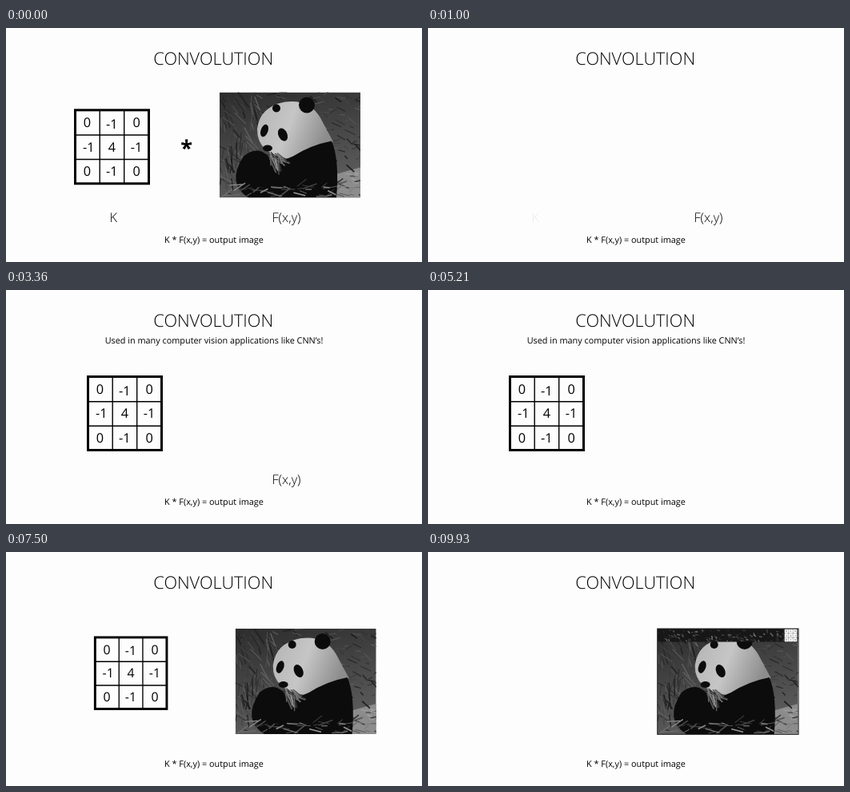
An HTML page for the animation above (10 s loop, 520 by 293 pixels).

```html
<!DOCTYPE html>
<html lang="en">
<head>
<meta charset="utf-8">
<title>Convolution</title>
<style>
  html, body { margin: 0; width: 100%; height: 100%; overflow: hidden; background: #fefdfe; }
  svg { display: block; width: 100%; height: 100%; }
  text { font: 10.85px "Open Sans", sans-serif; text-anchor: middle; text-rendering: geometricPrecision; }
  .title { font-size: 21.7px; font-weight: 300; }
  .label { font-size: 16.3px; font-weight: 300; }
  #star { font-size: 27.1px; font-weight: 700; }
  #kernel text { font-size: 16.3px; }
</style>
</head>
<body>
<svg viewBox="0 0 520 293">
  <defs>
    <linearGradient id="ground" x2=".3" y2="1">
      <stop stop-color="#2c2c2c"/><stop offset="1" stop-color="#5c5c5c"/>
    </linearGradient>
    <linearGradient id="fur" x2="1" y2=".3">
      <stop stop-color="#b4b4b4"/><stop offset=".5" stop-color="#c6c6c6"/><stop offset="1" stop-color="#8c8c8c"/>
    </linearGradient>
    <clipPath id="frame"><rect width="176" height="132"/></clipPath>
    <clipPath id="done"><rect id="doneArea" height="16.5"/></clipPath>
  </defs>

  <text class="title" x="259.2" y="45.8">CONVOLUTION</text>
  <text id="subtitle" x="260" y="67.2">Used in many computer vision applications like CNN’s!</text>
  <text x="260" y="269.1">K * F(x,y) = output image</text>
  <text class="label" id="kLabel" x="134.2" y="242.9">K</text>
  <text class="label" id="fLabel" x="350.5" y="242.9">F(x,y)</text>
  <text id="star" x="225.6" y="159.8">*</text>

  <g id="photo">
    <g clip-path="url(#frame)" stroke-linecap="round">
      <rect width="176" height="132" fill="url(#ground)"/>
      <path d="M140 104L176 94V132H140Z" fill="#8c8c8c"/>
      <g id="scenery"></g>
      <path d="M47 46Q50 18 82 12Q112 8 126 32L142 62L92 84Q46 78 47 46Z" fill="url(#fur)"/>
      <g fill="#0c0c0c">
        <circle cx="109" cy="16" r="10"/>
        <circle cx="71" cy="20" r="5"/>
        <ellipse rx="4.5" ry="8" transform="translate(56 48) rotate(20)"/>
        <ellipse rx="5.5" ry="8.5" transform="translate(79 53) rotate(-24)"/>
        <ellipse cx="60" cy="70" rx="6" ry="4"/>
        <path d="M92 80Q114 66 140 61Q150 84 146 132H36Q8 114 30 80Q52 62 68 90Z"/>
      </g>
      <g id="meal"></g>
      <g id="output" clip-path="url(#done)"><rect width="176" height="17" fill="#171717"/></g>
    </g>
    <rect id="edge" width="176.4" height="132.4" fill="none" stroke="#222"/>
  </g>

  <g id="kernel"></g>
</svg>
<script>
const $ = id => document.getElementById(id);
const FPS = 14, LOOP = 10000, SIZE = 95, SMALL = 17;

let seed = 7;
const rand = (lo, hi) => {
  seed = (seed * 16807) % 2147483647;
  return lo + (hi - lo) * seed / 2147483647;
};
const around = (value, spread) => rand(value * (1 - spread), value * (1 + spread));

// Strokes thrown into a box, each varying around the given angle, length and grey.
function scatter(id, count, [x, y, w, h], angle, length, grey) {
  let marks = '';
  for (let i = 0; i < count; i++) {
    const turn = (angle + rand(-40, 40)) * Math.PI / 180, reach = around(length, .6), tone = around(grey, .6);
    marks += `<path d="M${x + rand(0, w)} ${y + rand(0, h)}l${reach * Math.cos(turn)} ${reach * Math.sin(turn)}"
      stroke="rgb(${tone},${tone},${tone})" stroke-width="${rand(.6, 1.8)}"/>`;
  }
  $(id).insertAdjacentHTML('beforeend', marks);
}
scatter('scenery', 130, [0, 0, 48, 110], 65, 15, 62);
scatter('scenery', 130, [45, 0, 130, 95], 10, 9, 58);
scatter('scenery', 30, [138, 100, 38, 32], -10, 9, 105);
scatter('meal', 24, [62, 74, 14, 10], 50, 14, 100);
scatter('meal', 40, [0, 116, 140, 16], -10, 12, 95);
scatter('output', 110, [0, 1, 176, 16], 40, 2.5, 75);

const lines = [32.2, 62.7].map(at => `M${at} 2V93M2 ${at + .5}H93`).join('');
$('kernel').innerHTML =
  `<rect x="1.5" y="1.5" width="92" height="92" fill="#fefdfe" stroke="#000" stroke-width="3"/>
   <path d="${lines}" stroke="#000" stroke-width="1.4"/>`;
for (let row = 0; row < 3; row++) {
  for (let col = 0; col < 3; col++) {
    const steps = Math.abs(row - 1) + Math.abs(col - 1);
    const value = [4, -1, 0][steps];
    const nudge = row + col === 1 ? 1.8 : 0;
    $('kernel').insertAdjacentHTML('beforeend',
      `<text x="${16.5 + 30.8 * col + nudge * row}" y="${22.8 + 30.6 * row + nudge * col}">${value}</text>`);
  }
}

const mix = (a, b, p) => a + (b - a) * p;
const sine = p => (1 - Math.cos(Math.PI * p)) / 2;
const fade = (id, value) => $(id).setAttribute('opacity', value);
const place = (id, x, y, scale = 1) =>
  $(id).setAttribute('transform', `translate(${x} ${y}) scale(${scale})`);

function drawKernel(n, ramp) {
  if (n < 20) {
    place('kernel', 85, 101.3);
    fade('kernel', 1 - ramp(0, 14));
  } else if (n < 104) {
    const p = ramp(38, 47);
    place('kernel', 101 - 52 * (1 - p) ** 2, 107);
    fade('kernel', p);
  } else if (n < 119) {
    const t = ramp(104, 115), p = (t + sine(t)) / 2;
    const size = mix(SIZE, 50, p);
    place('kernel', mix(148.5, 286, p) - size / 2, mix(154.5, 104, p) - size / 2, size / SIZE);
    fade('kernel', 1 - ramp(111, 115));
  } else {
    const x = 158 * sine(ramp(122, 138));
    place('kernel', 287 + x, 96, SMALL / SIZE);
    fade('kernel', 1);
    $('doneArea').setAttribute('width', x);
  }
}

function draw(time) {
  const n = Math.floor((time % LOOP + 6) * FPS / 1000) % (LOOP * FPS / 1000);
  const ramp = (from, to) => Math.min(1, Math.max(0, (n - from) / (to - from)));
  const opening = n < 20, filtering = n >= 119;

  fade('kLabel', 1 - ramp(0, 15));
  fade('star', 1 - ramp(0, 13));
  fade('fLabel', n < 73 ? 1 : 0);
  fade('subtitle', n < 76 ? ramp(15, 26) : 1 - ramp(76, 83.2));

  place('photo', opening ? 267 : 286.7, opening ? 80.5 : 96);
  fade('photo', opening ? 1 - ramp(0, 13) : ramp(76, 90));
  fade('edge', filtering ? 1 : 0);
  fade('output', filtering ? 1 : 0);
  drawKernel(n, ramp);
}

const start = performance.now();
function tick() {
  draw(performance.now() - start);
  requestAnimationFrame(tick);
}
tick();
</script>
</body>
</html>
```
